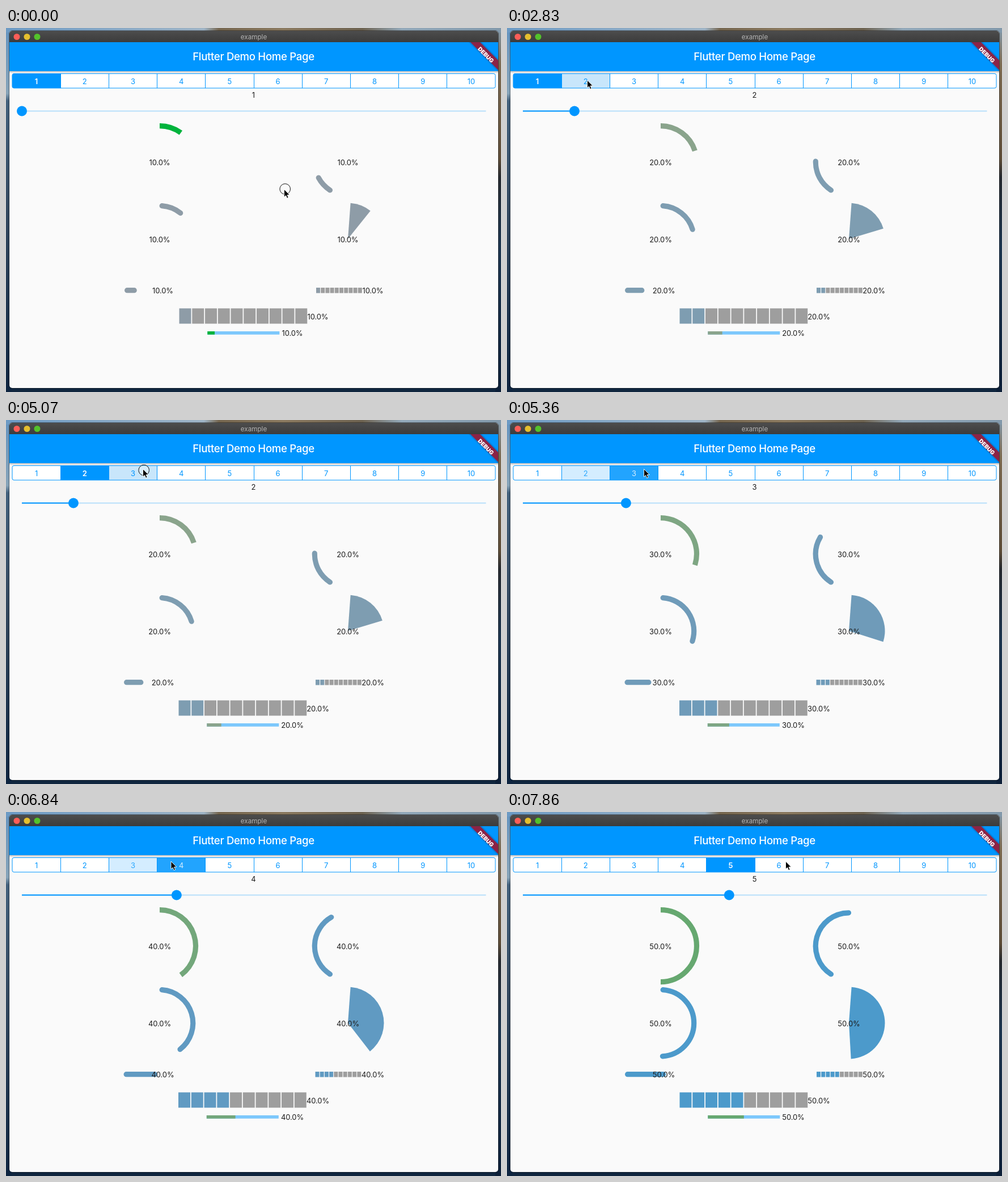
An HTML page that plays this animation: 873x642 px, repeating every 8 s.

```html
<!DOCTYPE html>
<html lang="en">
<head>
<meta charset="utf-8">
<title>example</title>
<style>
  html, body { margin: 0; width: 100%; height: 100%; overflow: hidden; background: #10263f; }
  svg { display: block; width: 873px; height: 642px; }
  text { font: 13px Inter, "Open Sans", sans-serif; text-anchor: middle; fill: #1c1c1c; }
  .pct text { letter-spacing: -.1px; }
  .title { font-size: 11.7px; fill: #b4b4b4; }
  .head { font-size: 18.6px; font-weight: 500; letter-spacing: -.32px; fill: #fff; }
  .debug { font-size: 10px; font-weight: 900; fill: #fff; }
</style>
</head>
<body>
<svg id="stage" viewBox="0 0 873 642">
  <defs>
    <linearGradient id="sky">
      <stop offset="0" stop-color="#6c9ac4"/><stop offset=".4" stop-color="#9fb4c6"/>
      <stop offset=".43" stop-color="#75664f"/><stop offset=".56" stop-color="#8b7a60"/>
      <stop offset=".72" stop-color="#6d6250"/><stop offset=".8" stop-color="#93a9ba"/>
      <stop offset="1" stop-color="#8299ab"/>
    </linearGradient>
    <linearGradient id="west" x2="0" y2="1">
      <stop offset="0" stop-color="#6494c0"/><stop offset=".18" stop-color="#86a3b8"/>
      <stop offset=".2" stop-color="#42607c"/><stop offset=".5" stop-color="#33485f"/>
      <stop offset="1" stop-color="#0d2440"/>
    </linearGradient>
    <linearGradient id="east" x2="0" y2="1">
      <stop offset="0" stop-color="#8299ab"/><stop offset=".1" stop-color="#7d6b52"/>
      <stop offset=".36" stop-color="#5e4d38"/><stop offset=".41" stop-color="#262a30"/>
      <stop offset=".6" stop-color="#1d3650"/><stop offset="1" stop-color="#0c1f38"/>
    </linearGradient>
    <linearGradient id="bar" x2="0" y2="1">
      <stop offset="0" stop-color="#4d4d4d"/><stop offset="1" stop-color="#3b3b3b"/>
    </linearGradient>
    <linearGradient id="shade" x2="0" y2="1">
      <stop offset="0" stop-color="#b9bcbe"/><stop offset="1" stop-color="#fafafa"/>
    </linearGradient>
    <clipPath id="win"><rect x="6" y="5" width="862" height="630" rx="5"/></clipPath>
    <clipPath id="tabClip"><rect x="11" y="80.5" width="852" height="25.5" rx="3"/></clipPath>
  </defs>

  <rect width="873" height="642" fill="#10263f"/>
  <rect width="10" height="642" fill="url(#west)"/>
  <rect x="863" width="10" height="642" fill="url(#east)"/>
  <rect width="873" height="8" fill="url(#sky)"/>
  <rect x="5.5" y="4.5" width="863" height="631" rx="5.5" fill="none" stroke="#000" stroke-opacity=".4"/>

  <g clip-path="url(#win)">
    <rect x="6" y="5" width="862" height="630" fill="#fafafa"/>
    <rect x="6" y="5" width="862" height="20.5" fill="url(#bar)"/>
    <circle cx="19" cy="15.5" r="5.5" fill="#fc5d57"/>
    <circle cx="37" cy="15.5" r="5.5" fill="#e5bf2e"/>
    <circle cx="55" cy="15.5" r="5.5" fill="#53c22b"/>
    <text class="title" x="437" y="20">example</text>
    <rect x="6" y="76" width="862" height="4" fill="url(#shade)"/>
    <rect x="6" y="25" width="862" height="51" fill="#0096ff"/>
    <text class="head" x="436.5" y="57">Flutter Demo Home Page</text>
    <path d="M816 25H839L868 54V77Z" fill="#000" opacity=".15"/>
    <path d="M819 25H836L868 57V74Z" fill="#8b2346"/>
    <text class="debug" transform="translate(846.3 47.3) rotate(45)" y="3.6">DEBUG</text>
  </g>

  <g id="tabs" clip-path="url(#tabClip)"></g>
  <g id="tabLines" fill="none" stroke="#0096ff"></g>
  <g id="tabText"></g>

  <text id="count" x="436.5" y="123"></text>
  <path d="M28 146.5H846.5" stroke="#b8dffb" stroke-width="2"/>
  <path id="track" stroke="#0096ff" stroke-width="2"/>
  <circle id="knob" cy="146.5" r="9" fill="#0096ff"/>

  <g id="charts" fill="none"></g>
  <g id="pct" class="pct"></g>

  <circle id="ring" r="9.3" fill="#fff" fill-opacity=".25" stroke="#111"/>
  <path id="cursor" d="M0 0V13.8L3.1 10.9L5.2 15.8L7.6 14.8L5.5 10H9.8Z" fill="#000" stroke="#fff" stroke-width=".9"/>
</svg>
<script>
const LOOP = 8000, TAB_W = 85.2, BLUE = [0, 150, 255], PRESSED = [200, 230, 251], WHITE = [255, 255, 255];
const $ = id => document.getElementById(id);

function add(parent, tag, attrs) {
  const el = document.createElementNS('http://www.w3.org/2000/svg', tag);
  set(el, attrs);
  return parent.appendChild(el);
}
function set(el, attrs) {
  for (const k in attrs) el.setAttribute(k, attrs[k]);
}
const mix = (a, b, k) => `rgb(${a.map((v, i) => Math.round(v + (b[i] - v) * k))})`;

// Each tap: press, release (value changes), selection fade, settled
const taps = [
  { value: 2, press: 2680, release: 2830, fade: 2970, done: 3120 },
  { value: 3, press: 5070, release: 5220, fade: 5360, done: 5510 },
  { value: 4, press: 6550, release: 6700, fade: 6840, done: 6990 },
  { value: 5, press: 7430, release: 7570, fade: 7720, done: 7860 }
];

// time, x, y of the pointer; it jumps from one place to the next
const pointer = [
  [0, 490.5, 284.5], [1650, 330, 190], [1790, 152, 92], [2090, 148, 90], [2240, 145, 90],
  [2380, 143, 91], [2530, 141.5, 92], [2970, 165, 88], [3120, 217, 83], [3270, 250, 84],
  [3720, 246, 86], [3870, 241.5, 86.5], [5660, 254, 87], [5810, 274, 87], [5960, 291, 87],
  [6990, 308, 87], [7140, 342, 87], [7280, 370, 87], [7430, 384.5, 87], [7720, 430, 87], [7860, 491.5, 87]
];

const greens = ['#00b33c', '#8aa48c', '#7ea683', '#73a77b', '#66a870'];
const blues = ['#8e9ca7', '#7e9db1', '#6f9bb9', '#609ac2', '#4c9acb'];
const shifts = [0, -1, -1.5, -1.5, -1];

// Angles in degrees, clockwise from the top
function polar(cx, cy, r, deg) {
  const a = deg * Math.PI / 180;
  return `${(cx + r * Math.sin(a)).toFixed(2)} ${(cy - r * Math.cos(a)).toFixed(2)}`;
}
function arc(cx, cy, r, from, to) {
  return `M${polar(cx, cy, r, from)}A${r} ${r} 0 ${+(to - from > 180)} 1 ${polar(cx, cy, r, to)}`;
}

const tabs = [], labels = [];
for (let i = 0; i < 10; i++) {
  const x = 11 + i * TAB_W;
  tabs.push(add($('tabs'), 'rect', { x, y: 80, width: TAB_W + .3, height: 27 }));
  if (i) add($('tabLines'), 'path', { d: `M${Math.floor(x) + .5} 80.5V106` });
  const label = add($('tabText'), 'text', { x: x + TAB_W / 2, y: 98.7 });
  label.textContent = i + 1;
  labels.push(label);
}
add($('tabLines'), 'rect', { x: 11, y: 80.5, width: 852, height: 25.5, rx: 3 });

const charts = $('charts');
const ringGreen = add(charts, 'path', { 'stroke-width': 9.2 });
const round = { 'stroke-width': 9.2, 'stroke-linecap': 'round' };
const ringRight = add(charts, 'path', round);
const ringLeft = add(charts, 'path', round);
const pie = add(charts, 'path', {});
const line = add(charts, 'path', round);
const row = add(charts, 'g', {});
const cells = [];
for (const [x, y, step, w, h] of [[547, 458, 8.2, 7, 9.5], [305.5, 494.5, 22.75, 21, 27]])
  cells.push(Array.from({ length: 10 }, (_, i) => add(row, 'rect', { x: x + i * step, y, width: w, height: h })));
add(row, 'rect', { x: 355.3, y: 535, width: 127, height: 5.7, fill: '#7cc8fc' });
const progress = add(row, 'rect', { x: 355.3, y: 535, height: 5.7 });

const percents = [[271, 237], [603, 237], [271, 373], [603, 373], [276.5, 463.5], [647, 463.5], [550, 509], [505, 538.5]]
  .map(([x, y]) => add($('pct'), 'text', { x, y: y + 4.7 }));

function showValue(v) {
  const green = greens[v - 1], blue = blues[v - 1], dx = shifts[v - 1];
  const x = 28 + (v - 1) * 818.5 / 9, end = 4.2 + 34.5 * v;
  $('count').textContent = v;
  set($('track'), { d: `M28 146.5H${x}` });
  set($('knob'), { cx: x });
  set(ringGreen, { d: arc(271, 236.2, 63.5, 0, 36 * v), stroke: green });
  set(ringRight, { d: arc(603, 236.5, 58.7, 212.5, 212.5 + 29.4 * v), stroke: blue });
  set(ringLeft, { d: arc(271, 372.2, 58.7, 4, end), stroke: blue });
  set(pie, { d: arc(603, 372, 63.5, 4.2, end) + 'L603 372Z', fill: blue });
  set(line, { d: `M${213.6 + dx} 462.7h${12.6 * v}`, stroke: blue });
  set(row, { transform: `translate(${dx} 0)` });
  for (const set10 of cells) set10.forEach((c, i) => set(c, { fill: i < v ? blue : '#9e9e9e' }));
  set(progress, { width: 12.7 * v, fill: green });
  for (const p of percents) p.textContent = v + '0.0%';
}

function showTabs(selected, pressed, fade) {
  tabs.forEach((tab, i) => {
    let fill = mix(WHITE, WHITE, 0), ink = mix(BLUE, BLUE, 0), on = i + 1 === selected;
    if (on) {
      fill = mix(BLUE, WHITE, fade);
      ink = mix(WHITE, BLUE, fade);
    } else if (i + 1 === pressed) {
      fill = mix(PRESSED, BLUE, fade);
      ink = mix(BLUE, WHITE, fade);
    }
    set(tab, { fill });
    labels[i].style.fill = ink;
    labels[i].style.fontWeight = on && !fade ? 600 : 400;
  });
}

let shown = 0;
function draw(t) {
  let value = 1, selected = 1, pressed = 0, fade = 0, ring = t < 150;
  for (const tap of taps) {
    if (t >= tap.release) value = tap.value;
    if (t >= tap.done) selected = tap.value;
    else if (t >= tap.press) {
      pressed = tap.value;
      fade = t >= tap.fade ? .83 : 0;
      ring = t < tap.release;
    }
  }
  if (value !== shown) showValue(shown = value);
  showTabs(selected, pressed, fade);

  const [, x, y] = pointer.findLast(p => p[0] <= t);
  set($('cursor'), { transform: `translate(${x} ${y})` });
  set($('ring'), { cx: x + 1.7, cy: y + (t < 150 ? -.5 : 2), visibility: ring ? 'visible' : 'hidden' });
}

const start = performance.now();
function tick() {
  draw((performance.now() - start) % LOOP);
  requestAnimationFrame(tick);
}
tick();
</script>
</body>
</html>
```
